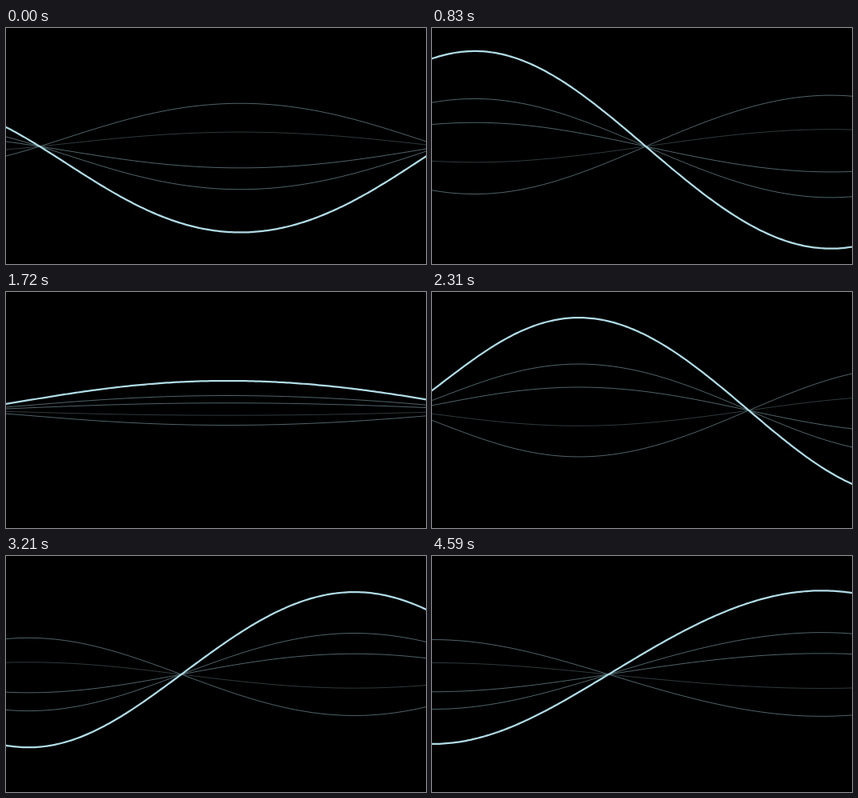
These frames come from a looping animation (525 by 295 pixels, 4.69 s). An HTML page with a canvas:

```html
<!DOCTYPE html>
<html lang="en">
<head>
<meta charset="utf-8">
<title>Voice wave</title>
<style>
  html, body { margin: 0; width: 100%; height: 100%; overflow: hidden; background: #000; }
  canvas { display: block; }
</style>
</head>
<body>
<canvas id="stage" width="525" height="295"></canvas>
<script>
const ctx = document.getElementById('stage').getContext('2d');
const WIDTH = 525, HEIGHT = 295, MIDDLE = 148;
const LOOP = 4690, STEP = 59.2, LAST_STEP = 77.5;
const CENTER = 320, SPREAD = 514;   // peak and reach of the envelope

// Loudness of the voice: [step, amplitude in px, radians per 1000 px]
const voice = [
  [0, 107.5, 6.26],
  [9, 149, 6.5],
  [16, 125, 6.6],
  [28, 37, 4.75],
  [36, 37, 4.75],
  [39, 116.5, 7.3],
  [45, 154, 7.25],
  [54, 103.2, 7.2],
  [63, 132, 7.3],
  [69, 140, 7.1],
  [76, 106, 5.72]
];

const smooth = u => u * u * (3 - 2 * u);

function voiceAt(step) {
  const next = Math.max(1, voice.findIndex(key => key[0] >= step));
  if (step >= voice.at(-1)[0]) return voice.at(-1);
  const from = voice[next - 1], to = voice[next];
  const u = smooth((step - from[0]) / (to[0] - from[0]));
  return from.map((value, i) => value + (to[i] - value) * u);
}

// Steady travel to the right with a slight sway
function phaseAt(step) {
  const turn = 2 * Math.PI * step / LAST_STEP;
  return 1.74 - 0.5421 * step - 0.033 * Math.sin(turn) - 0.074 * Math.sin(2 * turn);
}

// The picture advances in even steps, then rests before the closing pose
function stepAt(time) {
  return time >= 4588 ? LAST_STEP : Math.min(75, Math.floor((time + 5) / STEP));
}

function drawWave(divisor, alpha, lineWidth, step) {
  const [, amplitude, frequency] = voiceAt(step);
  const phase = phaseAt(step);
  ctx.globalAlpha = alpha;
  ctx.lineWidth = lineWidth;
  ctx.beginPath();
  for (let x = -3; x <= WIDTH + 3; x += 3) {
    const d = x - CENTER;
    const envelope = Math.exp(-((d / SPREAD) ** 4));
    const swing = Math.sin(frequency / 1000 * d + phase);
    ctx.lineTo(x, MIDDLE + amplitude / divisor * envelope * swing);
  }
  ctx.stroke();
}

function draw(step) {
  ctx.globalAlpha = 1;
  ctx.fillStyle = '#000';
  ctx.fillRect(0, 0, WIDTH, HEIGHT);
  ctx.strokeStyle = '#b0dce6';
  drawWave(-6, 0.26, 1, step);
  for (const divisor of [-2, 4, 2]) drawWave(divisor, 0.45, 1, step);
  drawWave(1, 1, 2.25, step);
}

const start = performance.now();
function frame() {
  draw(stepAt((performance.now() - start) % LOOP));
  requestAnimationFrame(frame);
}
frame();
</script>
</body>
</html>
```
